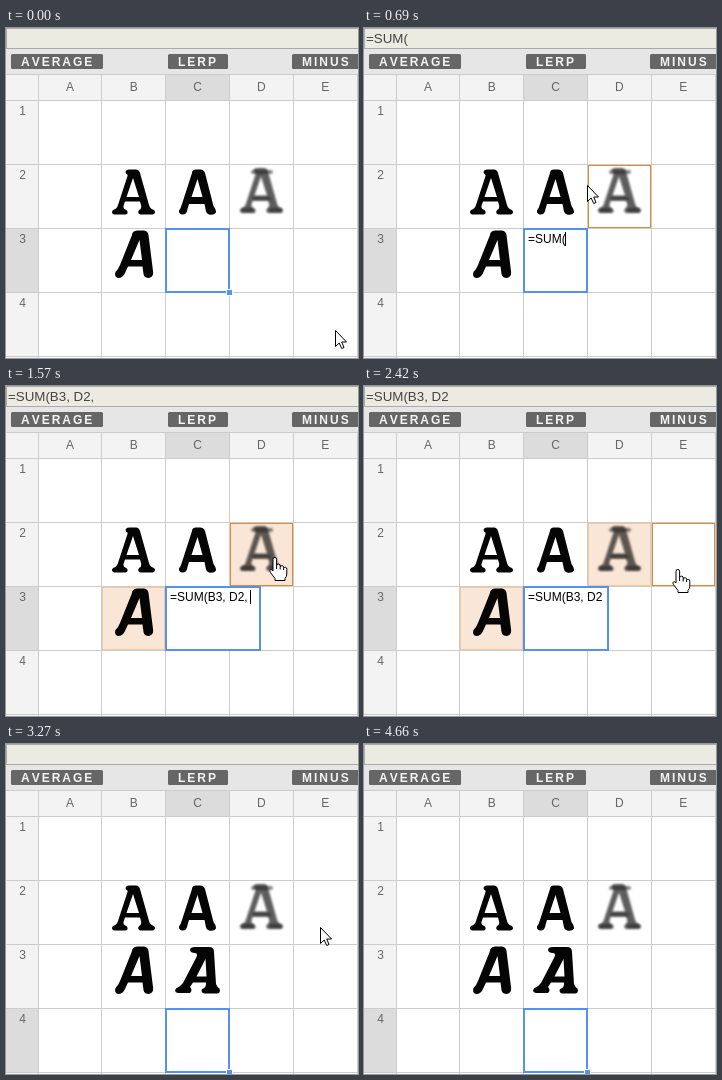
These frames come from a looping animation (352 by 330 pixels, 5.21 s). An HTML page:

```html
<!DOCTYPE html>
<html lang="en">
<head>
<meta charset="utf-8">
<title>Letter spreadsheet</title>
<style>
  html, body { margin: 0; width: 100%; height: 100%; overflow: hidden; background: #fff; }
  svg { display: block; width: 352px; height: 330px; }
  text { font-family: "Liberation Sans", Arial, sans-serif; font-size: 12px; white-space: pre; }
  .head { fill: #666; text-anchor: middle; }
  .button { fill: #f4f4f4; font-weight: bold; letter-spacing: 2px; font-kerning: none; }
  .glyph { fill: #050505; fill-rule: evenodd; filter: blur(.6px); }
  .faint { fill: #111; filter: blur(1.2px); }
  .smudge { fill: none; stroke: #222; stroke-linecap: round; filter: blur(.9px); }
</style>
</head>
<body>
<svg id="stage" viewBox="0 0 352 330"></svg>
<script>
const LOOP = 5210;
const COLS = "ABCDE";
const BLUE = "#5391f3";
const stage = document.getElementById("stage");

function add(tag, attrs = {}, parent = stage, text = "") {
  const node = document.createElementNS("http://www.w3.org/2000/svg", tag);
  set(node, attrs);
  node.textContent = text;
  parent.appendChild(node);
  return node;
}
function set(node, attrs) {
  for (const key in attrs) node.setAttribute(key, attrs[key]);
}
function show(node, visible) {
  node.style.display = visible ? "" : "none";
}
function box(x, y, width, height, fill, parent) {
  return add("rect", { x, y, width, height, fill }, parent);
}
// Top left pixel of a cell such as "C3"; the grid lines lie one pixel before it.
function cellAt(name) {
  const col = COLS.indexOf(name[0]);
  return { x: col ? 32 + 64 * col : 33, y: 9 + 64 * Number(name[1]) };
}

// Toolbar
box(0, 0, 352, 46, "#e6e6e6");
box(0, 0, 352, 21, "#aaa");
box(0, 1, 352, 19, "#ecebe2");
box(0, 1, 1, 19, "#aaa");
for (const [label, x, width] of [["AVERAGE", 5, 92], ["LERP", 162, 60], ["MINUS", 286, 70]]) {
  add("rect", { x, y: 26, width, height: 15, rx: 1.5, fill: "#666" });
  add("text", { x: x + 10, y: 38, class: "button" }, stage, label);
}
const formula = add("text", { x: 2, y: 15, fill: "#444", style: "font-size:13.33px" });

// Headers and grid
box(0, 46, 352, 27, "#f3f3f3");
box(0, 73, 32, 257, "#f3f3f3");
box(160, 47, 63, 25, "#dcdcdc");
const rowMark = box(0, 201, 32, 63, "#dcdcdc");
const fills = {};
for (const name of ["B3", "D2"]) {
  const { x, y } = cellAt(name);
  fills[name] = add("rect", {
    x: x + .5, y: y + .5, width: 62, height: 62, fill: "#fae6d6", stroke: "#f3c9a2"
  });
}
for (const x of [32, 95, 159, 223, 287, 351]) box(x, 46, 1, 284, "#ccc");
for (const y of [46, 72, 136, 200, 264, 328]) box(0, y, 352, 1, "#ccc");
[...COLS].forEach((name, i) =>
  add("text", { x: 64 + i * 63.8, y: 63, class: "head" }, stage, name));
for (let row = 1; row < 5; row++)
  add("text", { x: 16.5, y: 23 + 64 * row, class: "head" }, stage, row);

// Letters
function letter(d, attrs) {
  return add("path", { class: "glyph", d, ...attrs });
}
const slab =
  "M119.5 144Q120 141.5 123 141.5H130Q133 141.5 134 145L143 177Q144 181 148 182Q150.5 185 147 186.5" +
  "H134Q131 185 133 182Q136 181 135 177L134 173.5H119L117.5 178Q117 181 120.5 182Q123 185 120 186.5" +
  "H108Q104.5 185 107 182Q111 181 112 177L121.5 148Q122 146 120 145.5ZM120.5 169H133L127 150Z";
letter(slab);
letter(
  "M186 145Q186 141.5 190 141.5H194Q198 141.5 199 145L207.5 178Q210.5 182 210 184.5" +
  "Q208 187.5 203 186.5Q200 185.5 199.5 181L198.5 176H183L181.5 181Q181 186.5 176.5 186.5" +
  "Q172.5 186 173 182.5Q175 180 176 176ZM185.5 169H196.5L191.5 151Z");
letter(slab, { class: "glyph faint", transform: "translate(128 -1.5)", opacity: .68 });
add("path", {
  class: "smudge", "stroke-width": 4, opacity: .55,
  d: "M247 144H249M263 144H265M250 144H262M237 182H246M265 182H274M248 171H263"
});
letter(
  "M126 207Q126 203 131 202.5H138Q142 203 142.5 207L147 243Q148 249 143 250Q138 250 137.5 246" +
  "L136.5 238.5H122L119 245Q117 250 112 250Q108 249 109.5 244Q112 242 114 237Z" +
  "M125 232H136L133.5 212Z");
const result = letter(
  "M184 206Q184 203 189 203H203Q208 203 208 208L210 240Q211 243 213.5 244.5Q215 249 211 249.5" +
  "H198Q194.5 248.5 196 245Q200 244 200 240V238.5H187L184 243Q187 246 184 249" +
  "H172Q167.5 248 170 244.5Q174 243 177 239L190.5 213Q192 209 189 209Q184.5 209 184 206Z" +
  "M190.5 232.5H200.5L199.5 215Z");

const hover = add("rect", { width: 62, height: 62, fill: "none", stroke: "#e08a35" });

// Selection and cell editor
const selection = add("g");
const frame = { y: 201, height: 63, stroke: BLUE, "stroke-width": 2 };
add("rect", { ...frame, x: 160, width: 63, fill: "none" }, selection);
const editor = add("g");
const editorBox = add("rect", { ...frame, x: 160, fill: "#fff" }, editor);
const editorText = add("text", { x: 164, y: 215, fill: "#000" }, editor);
const caret = box(0, 204, 1, 14, "#000", editor);
const handle = add("g");
box(220, 261, 7, 7, "#fff", handle);
box(221, 262, 5, 5, BLUE, handle);

// Pointers, with the hot spot at 0,0
const outline = { fill: "#fff", stroke: "#000", "stroke-linejoin": "round" };
const pointers = {
  arrow: add("path", { ...outline, d: "M.5 .5V16.5L4.2 13L6.7 18.5L9 17.5L6.7 12H11.5Z" }),
  hand: add("path", {
    ...outline,
    d: "M-2 14V2.2a1.8 1.8 0 0 1 3.6 0V8.5a1.8 1.6 0 0 1 3.6 .6V10a1.7 1.5 0 0 1 3.4 .6V11.5" +
       "a1.6 1.5 0 0 1 3.2 .8V17q0 2.5-1.8 4.5V23.5H0V21.5L-4.6 15.5q-1.2-2 .2-2.7q1.2-.5 2.4 1.2Z" +
       "M1.6 8.5V12M5.2 10V12.5M8.6 11.5V13"
  })
};

// Each step changes only the listed properties.
const steps = [
  [0, { bar: "", entry: null, caret: false, row: 3, handle: true, done: false, hover: null, picked: [],
        pointer: "arrow", at: [329, 302] }],
  [70, { pointer: null }],
  [220, { entry: "", caret: true }],
  [540, { bar: "=SUM(", entry: "=SUM(", handle: false }],
  [610, { pointer: "hand", at: [258, 151], hover: "D2" }],
  [690, { pointer: "arrow", at: [223, 157] }],
  [770, { pointer: "hand", at: [190, 175], hover: "C2" }],
  [850, { at: [168, 196] }],
  [930, { at: [157, 219], hover: "B3" }],
  [1010, { at: [154, 225] }],
  [1090, { bar: "=SUM(B3,", entry: "=SUM(B3, ", picked: ["B3"] }],
  [1250, { at: [206, 192], hover: "C2" }],
  [1330, { at: [269, 171], hover: "D2" }],
  [1570, { bar: "=SUM(B3, D2,", entry: "=SUM(B3, D2, ", picked: ["B3", "D2"] }],
  [1800, { at: [314, 183], hover: "E2" }],
  [2100, { caret: false }],
  [2270, { entry: "=SUM(B3, D2," }],
  [2420, { bar: "=SUM(B3, D2", entry: "=SUM(B3, D2" }],
  [2650, { bar: "=SUM(B3, D2)", entry: "=SUM(B3, D2)", caret: true }],
  [2730, { pointer: "arrow", hover: null }],
  [3190, { bar: "", entry: null, row: 4, handle: true, picked: [] }],
  [3270, { done: true }],
  [4520, { at: [314, 238] }],
  [4590, { at: [314, 298] }],
  [4660, { pointer: null }]
];

const ruler = document.createElement("canvas").getContext("2d");
ruler.font = '12px "Liberation Sans", Arial, sans-serif';

function drawEditor(entry, caretOn) {
  show(editor, entry !== null);
  if (entry === null) return;
  const end = 164 + ruler.measureText(entry).width;
  const right = Math.max(224, Math.round(end + (entry.endsWith(" ") ? 10 : 7)));
  set(editorBox, { width: right - 161 });
  editorText.textContent = entry;
  set(caret, { x: Math.floor(end - .5) });
  show(caret, caretOn);
}

function render(time) {
  const state = {};
  for (const [start, change] of steps) if (start <= time) Object.assign(state, change);

  formula.textContent = state.bar;
  drawEditor(state.entry, state.caret);
  const shift = `translate(0 ${64 * (state.row - 3)})`;
  for (const node of [rowMark, selection, handle]) set(node, { transform: shift });
  show(selection, state.entry === null);
  show(handle, state.handle);
  show(result, state.done);

  for (const name in fills) show(fills[name], state.picked.includes(name));
  show(hover, state.hover);
  if (state.hover) {
    const { x, y } = cellAt(state.hover);
    set(hover, { x: x + .5, y: y + .5 });
  }
  for (const name in pointers) {
    show(pointers[name], name === state.pointer);
    set(pointers[name], { transform: `translate(${state.at})` });
  }
}

const began = performance.now();
function tick() {
  render((performance.now() - began) % LOOP);
  requestAnimationFrame(tick);
}
tick();
</script>
</body>
</html>
```
